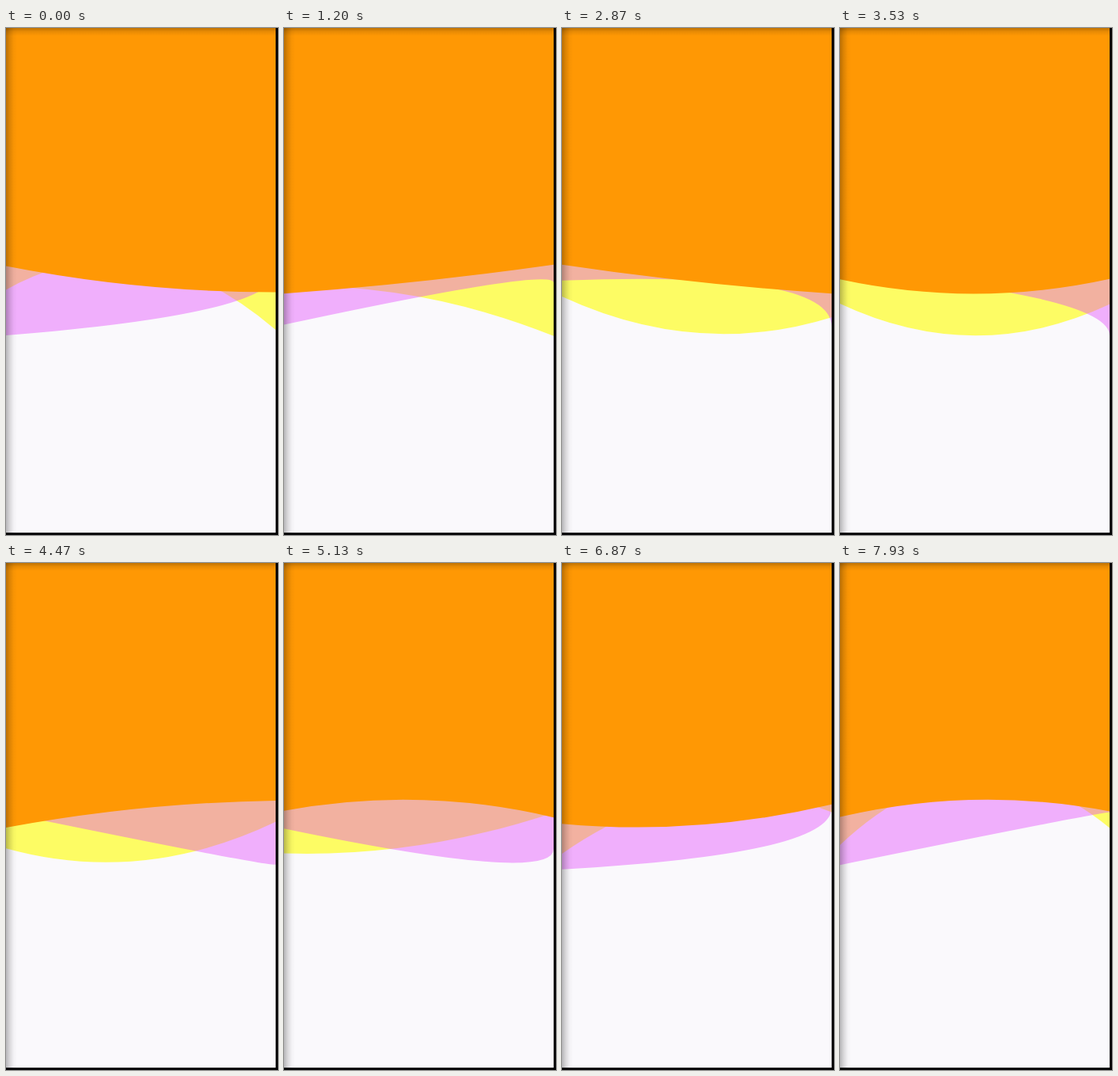
Recreate the animation shown at these times as an HTML page. Size 344 by 640 pixels, loop 8000 ms.

```html
<!DOCTYPE html>
<html lang="en">
<head>
<meta charset="utf-8">
<title>Waves</title>
<style>
  html, body { margin: 0; width: 100%; height: 100%; overflow: hidden; background: #030305; }
  svg { display: block; width: 100%; height: 100%; }
</style>
</head>
<body>
<svg viewBox="0 0 344 640">
  <defs>
    <linearGradient id="left">
      <stop offset="0" stop-opacity=".27"/>
      <stop offset=".35" stop-opacity=".13"/>
      <stop offset=".7" stop-opacity=".03"/>
      <stop offset="1" stop-opacity="0"/>
    </linearGradient>
    <linearGradient id="top" x2="0" y2="1">
      <stop offset="0" stop-opacity=".25"/>
      <stop offset=".45" stop-opacity=".09"/>
      <stop offset="1" stop-opacity="0"/>
    </linearGradient>
  </defs>
  <rect width="341" height="637" fill="#faf9fc"/>
  <path id="yellow" fill="#ffff00" fill-opacity=".6"/>
  <path id="purple" fill="#e040fb" fill-opacity=".4"/>
  <path id="orange" fill="#ff9804"/>
  <rect width="14" height="637" fill="url(#left)"/>
  <rect width="341" height="10" fill="url(#top)"/>
</svg>
<script>
  const LOOP = 8000, STEP = 1000 / 15, WIDTH = 341;

  // start, control and end: [middle height, swing]; bend: x of the control point
  const waves = [
    { id: 'yellow', period: 10000, phase: -127, bend: WIDTH / 2,
      start: [348, 22], control: [308, 120], end: [349, -40] },
    { id: 'purple', period: 7000, phase: 78, bend: WIDTH,
      start: [348, 41], control: [348, 61], end: [348, -41] },
    { id: 'orange', period: 3000, phase: -63, bend: WIDTH / 2,
      start: [317, 18.5], control: [317, 37], end: [317, -18.5] }
  ];
  for (const wave of waves) wave.path = document.getElementById(wave.id);

  const height = ([middle, swing], k) => (middle + swing * k).toFixed(2);

  function draw(time) {
    for (const w of waves) {
      const angle = (time / w.period * 360 + w.phase) * Math.PI / 180;
      const sin = Math.sin(angle), cos = Math.cos(angle);
      w.path.setAttribute('d',
        `M0 0V${height(w.start, sin)}Q${w.bend} ${height(w.control, cos)} ` +
        `${WIDTH} ${height(w.end, sin)}V0Z`);
    }
  }

  const began = performance.now();
  function tick() {
    const time = (performance.now() - began) % LOOP;
    draw(Math.floor((time + 4) / STEP) % 120 * STEP);
    requestAnimationFrame(tick);
  }
  tick();
</script>
</body>
</html>
```
